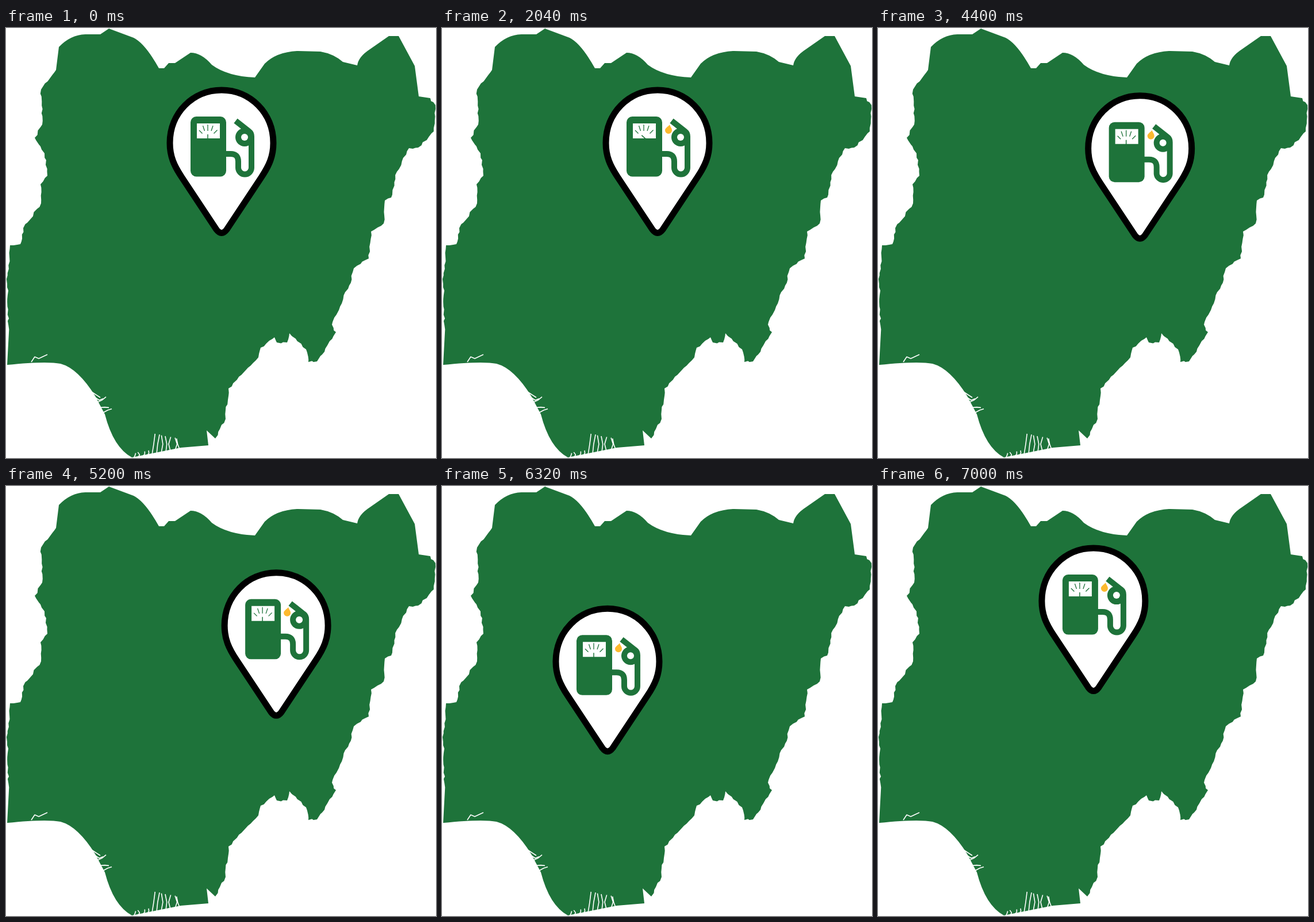
Write an HTML page that moves like this. It is 748x748 px and loops after 7.04 s.

```html
<!DOCTYPE html>
<html lang="en">
<head>
<meta charset="utf-8">
<title>Fuel stations</title>
<style>
  html, body { margin: 0; width: 100%; height: 100%; overflow: hidden; background: #fff; }
  svg { display: block; width: 100%; height: 100%; }
  .green { fill: #1e733a; }
  .line { fill: none; stroke: #1e733a; }
  #creeks { fill: none; stroke: #fff; stroke-width: 1.6; stroke-linejoin: round; }
</style>
</head>
<body>
<svg viewBox="0 0 748 748">
  <path id="land" class="green"/>
  <path id="creeks"/>

  <g id="pin">
    <path fill="#fff" stroke="#000" stroke-width="11" d="M375 108C425 108 465 148 465 200C465 223 458 239 444 260L384 350.5Q375 362.5 366 350.5L306 260C292 239 285 223 285 200C285 148 325 108 375 108Z"/>
    <rect class="green" x="321" y="154" width="62" height="104.5" rx="10"/>
    <path fill="#fff" d="M332 166h40v26h-40z"/>
    <path class="line" stroke-width="1.3" d="M351 168v11M342.5 170l3 9M360 170l-3 9M336 178l5.5 5.5M367.5 177.5l-6 6"/>
    <path id="needle" class="line" stroke-width="1.5" d="M351 185v9"/>
    <path class="line" stroke-width="10" d="M382 219H391Q404 219 404 232V243A11.5 11.5 0 0 0 427 243V189Q427 183 423 180L399.5 161.5"/>
    <circle class="green" cx="415" cy="190" r="16"/>
    <circle fill="#fff" cx="415" cy="190" r="6"/>
    <path id="drop" fill="#fdb92e" d="M396 168C397 172 400 174 400 178A6 6 0 0 1 388 178C388 174 393 172 396 168Z"/>
  </g>
</svg>
<script>
const $ = id => document.getElementById(id);
const mix = (a, b, p) => a + (b - a) * p;
const span = (t, from, to) => Math.min(1, Math.max(0, (t - from) / (to - from)));

let seed = 7;
const random = () => (seed = seed * 16807 % 2147483647) / 2147483647;
const jitter = size => (random() - .5) * 2 * size;

// Joins key points with a ragged border line
function ragged(text) {
  const points = text.split(",").map(pair => pair.trim().split(" ").map(Number));
  let path = "";
  points.forEach(([x, y], i) => {
    path += `L${x} ${y}`;
    if (i === points.length - 1) return;
    const [nx, ny] = points[i + 1];
    const parts = Math.ceil(Math.hypot(nx - x, ny - y) / 7);
    for (let k = 1; k < parts; k++) {
      path += `L${mix(x, nx, k / parts) + jitter(1.6)} ${mix(y, ny, k / parts) + jitter(1.6)}`;
    }
  });
  return path;
}

const north = `M92 33Q112 12 138 11H164L179 1 222 17Q242 27 266 70H275L283 61H294L321 43Q340 43 358 64
  Q385 84 433 86L450 62Q470 42 506 40L547 41Q570 45 586 59L611 65Q613 50 633 37L666 14H683L711 66L718 119`;
const east = ragged(`738 122, 747 134, 744 180, 717 208, 701 209, 680 250, 670 295, 659 300,
  657 340, 635 354, 631 401, 605 418, 597 448, 567 516, 574 529, 550 568, 541 580, 526 581,
  522 559, 493 531, 489 547, 471 547, 467 538, 443 556, 439 573, 387 627, 382 680, 364 714`);
const coast = "L349 700 352 726 304 730 219 747Q187 730 172 672L155 640Q125 592 95 584Q70 579 2 586";
const west = ragged(`5 530, 2 445, 7 378, 25 376, 30 348, 61 305, 60 272, 72 257, 67 218,
  50 191, 63 168, 61 107, 87 73`);
$("land").setAttribute("d", `${north}${east}${coast}${west}Z`);

// Lagoon, river mouths along the delta, inlets on its western shore
function creeks() {
  let path = "M44 581L50 572 57 575 72 568";
  for (let x = 222; x < 306; x += 8) {
    const shore = 749 - (x - 219) * .19;
    const reach = x < 250 ? 9 : mix(38, 18, (x - 250) / 55);
    path += `M${x} ${shore}l${jitter(4)} ${-reach / 2}l${jitter(4)} ${-reach / 2}`;
  }
  for (let i = 0; i < 5; i++) {
    path += `M${149 + i * 5} ${633 + i * 9}l8 ${jitter(6)}l7 ${jitter(6)}`;
  }
  return path;
}
$("creeks").setAttribute("d", creeks());

function bezier(x1, y1, x2, y2) {
  const at = (a, b, s) => 3 * a * s * (1 - s) ** 2 + 3 * b * s * s * (1 - s) + s ** 3;
  return p => {
    if (p <= 0 || p >= 1) return p;
    let lo = 0, hi = 1;
    for (let i = 0; i < 24; i++) {
      const s = (lo + hi) / 2;
      if (at(x1, x2, s) < p) lo = s; else hi = s;
    }
    return at(y1, y2, lo);
  };
}
const travel = bezier(.48, 0, .02, 1);
const smooth = bezier(.42, 0, .58, 1);
const fall = bezier(.2, .5, .3, 1);
const grow = bezier(.2, .3, .5, 1);

const LOOP = 7040, STEP = 40, LEG = 1000, DEPART = 4040;

// Pin stops, and the control point of the curve between each pair
const stops = [[0, 0], [110, 37], [-110, 184], [0, 0]];
const bends = [[77, -12], [-14.5, 84], [-92, 67]];

function pinAt(t) {
  if (t < DEPART) return stops[0];
  const i = Math.floor((t - DEPART) / LEG);
  const p = travel((t - DEPART) % LEG / LEG);
  const [from, bend, to] = [stops[i], bends[i], stops[i + 1]];
  return [0, 1].map(k => mix(mix(from[k], bend[k], p), mix(bend[k], to[k], p), p));
}

function dropAt(t) {
  if (t < 120) return { x: 0, y: 0, size: 0, alpha: 0 };
  if (t < 2040) {
    const p = grow(span(t, 40, 1960));
    return { x: mix(2, 0, p), y: mix(-6, 0, p), size: mix(.1, 1, p), alpha: 1 };
  }
  if (t < 3040) {
    return { x: 0, y: 31 * fall(span(t, 2040, 3040)), size: 1, alpha: 1 - span(t, 2400, 3040) };
  }
  const p = grow(span(t, 3040, 4000));
  return { x: mix(1, 0, p), y: mix(-2, 0, p), size: mix(.1, 1, p), alpha: span(t, 3040, 3400) };
}

function draw(t) {
  const angle = -48 * (smooth(span(t, 40, 2040)) - smooth(span(t, 2040, 3040)));
  const d = dropAt(t);
  $("pin").setAttribute("transform", `translate(${pinAt(t)})`);
  $("needle").setAttribute("transform", `rotate(${angle} 351 190)`);
  $("drop").setAttribute("transform",
    `translate(${396 + d.x} ${168 + d.y}) scale(${d.size}) translate(-396 -168)`);
  $("drop").setAttribute("opacity", d.alpha);
}

const begin = performance.now();
function tick() {
  const t = (performance.now() - begin) % LOOP;
  draw(Math.floor(t / STEP) * STEP);
  requestAnimationFrame(tick);
}
tick();
</script>
</body>
</html>
```
